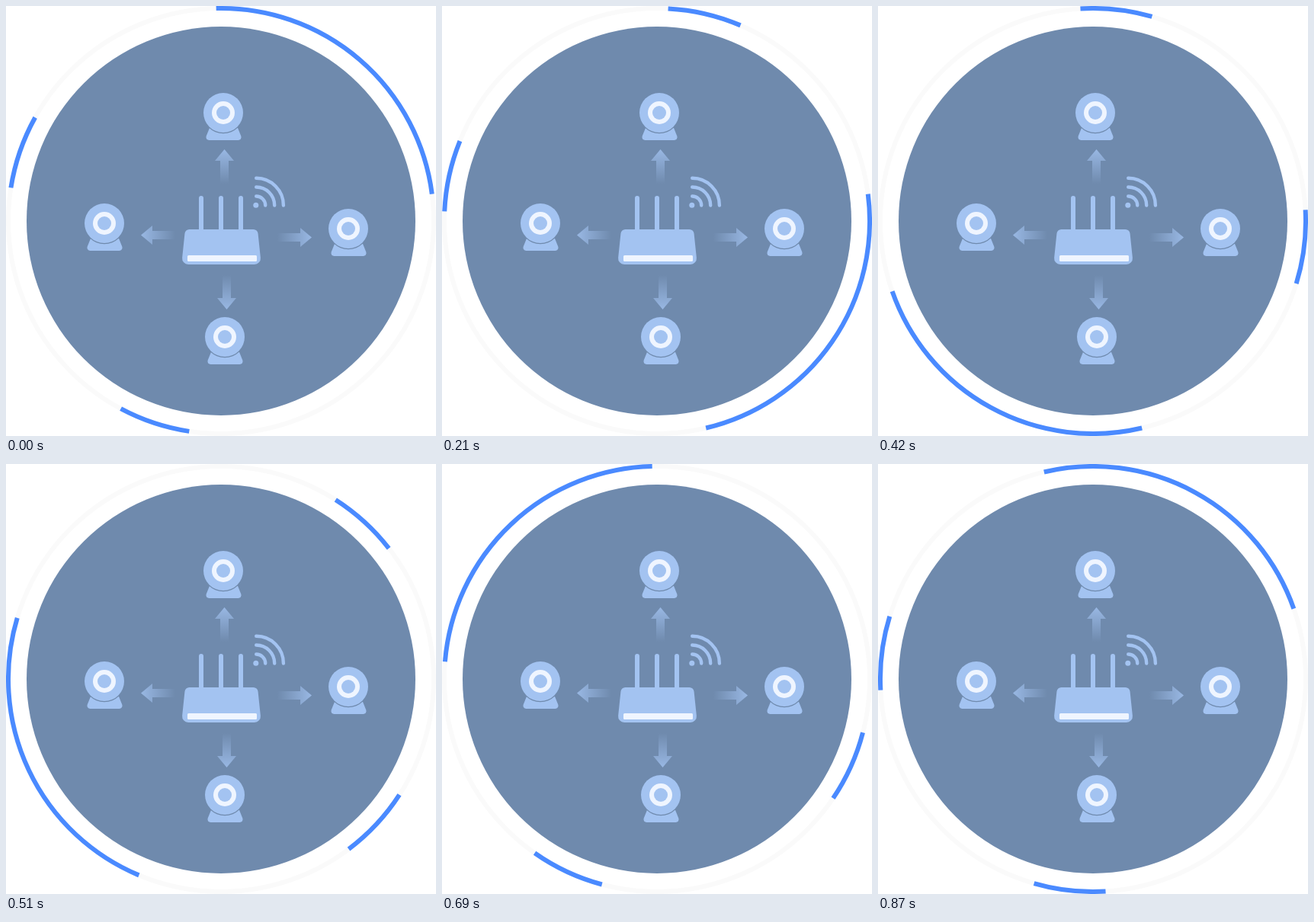
An HTML page with a canvas for the animation above (900 ms loop, 564x564 px).

```html
<!DOCTYPE html>
<html lang="en">
<head>
<meta charset="utf-8">
<title>Router and cameras</title>
<style>
html, body { margin: 0; width: 100%; height: 100%; overflow: hidden; background: #fff; }
canvas { display: block; }
</style>
</head>
<body>
<canvas id="stage" width="564" height="564"></canvas>
<script>
const ctx = document.getElementById('stage').getContext('2d');
const LOOP = 900, STEP = 30, CENTER = 282, TAU = Math.PI * 2;
const LIGHT = '#a3c3f1', PALE = '#eff5ff', DISC = '#6f8aad', BLUE = '#4a8aff', TRACK = '#fafafa';

// Start and end of each moving arc, in degrees clockwise from the top.
const ARCS = [[-1.3, 82.7], [188.6, 208.1], [279, 299.1]];
const CAMERAS = [[285, 140], [129, 285], [449, 292], [287, 434]];
// Tip position and number of quarter turns from pointing up.
const ARROWS = [[286.5, 188, 0], [401, 303.5, 1], [289.5, 398, 2], [177, 300.5, 3]];

const rad = deg => deg * Math.PI / 180;

function disc(x, y, r, color) {
  ctx.fillStyle = color;
  ctx.beginPath();
  ctx.arc(x, y, r, 0, TAU);
  ctx.fill();
}

function arc(x, y, r, from, to, width, color) {
  ctx.strokeStyle = color;
  ctx.lineWidth = width;
  ctx.beginPath();
  ctx.arc(x, y, r, rad(from - 90), rad(to - 90));
  ctx.stroke();
}

function box(x, y, w, h, radius, color) {
  ctx.fillStyle = color;
  ctx.beginPath();
  ctx.roundRect(x, y, w, h, radius);
  ctx.fill();
}

// Symmetric trapezoid with rounded corners.
function trapezoid(cx, top, bottom, topHalf, bottomHalf, topRadius, bottomRadius) {
  ctx.fillStyle = LIGHT;
  ctx.beginPath();
  ctx.moveTo(cx, top);
  ctx.arcTo(cx + topHalf, top, cx + bottomHalf, bottom, topRadius);
  ctx.arcTo(cx + bottomHalf, bottom, cx, bottom, bottomRadius);
  ctx.arcTo(cx - bottomHalf, bottom, cx - topHalf, top, bottomRadius);
  ctx.arcTo(cx - topHalf, top, cx, top, topRadius);
  ctx.closePath();
  ctx.fill();
}

function camera(x, y) {
  trapezoid(x + 0.5, y + 20, y + 36, 18.5, 25, 0.5, 4);
  disc(x, y, 27.3, DISC);
  disc(x, y, 26, LIGHT);
  disc(x, y, 15, PALE);
  disc(x, y, 9, LIGHT);
}

function arrow(x, y, turns) {
  const fade = ctx.createLinearGradient(0, 0, 0, 45);
  fade.addColorStop(0, 'rgba(163,195,241,0.8)');
  fade.addColorStop(1, 'rgba(163,195,241,0)');
  ctx.save();
  ctx.translate(x, y);
  ctx.rotate(turns * Math.PI / 2);
  ctx.fillStyle = fade;
  ctx.beginPath();
  ctx.moveTo(0, 0);
  for (const [px, py] of [[12.5, 15], [5.5, 15], [5.5, 45], [-5.5, 45], [-5.5, 15], [-12.5, 15]]) {
    ctx.lineTo(px, py);
  }
  ctx.fill();
  ctx.restore();
}

function router() {
  for (const x of [253, 279, 305]) box(x, 249, 6, 48, [3, 3, 0, 0], LIGHT);
  trapezoid(282.5, 293, 339, 47.5, 52.3, 6, 8);
  box(238, 327, 91, 8, 1.5, PALE);
}

function wifi() {
  disc(327.8, 261.3, 3.5, LIGHT);
  ctx.lineCap = 'round';
  for (const r of [12, 24, 35.7]) arc(328.2, 261.5, r, 0, 90, 4.4, LIGHT);
  ctx.lineCap = 'butt';
}

function draw(time) {
  const turn = Math.floor((time % LOOP) / STEP) * STEP / LOOP * 360;
  ctx.fillStyle = '#fff';
  ctx.fillRect(0, 0, 564, 564);
  arc(CENTER, CENTER, 279, 0, 360, 6, TRACK);
  for (const [from, to] of ARCS) arc(CENTER, CENTER, 279, from + turn, to + turn, 6, BLUE);
  disc(CENTER, CENTER, 255, DISC);
  for (const [x, y] of CAMERAS) camera(x, y);
  for (const [x, y, turns] of ARROWS) arrow(x, y, turns);
  router();
  wifi();
}

const start = performance.now();
function tick() {
  draw(performance.now() - start);
  requestAnimationFrame(tick);
}
tick();
</script>
</body>
</html>
```
